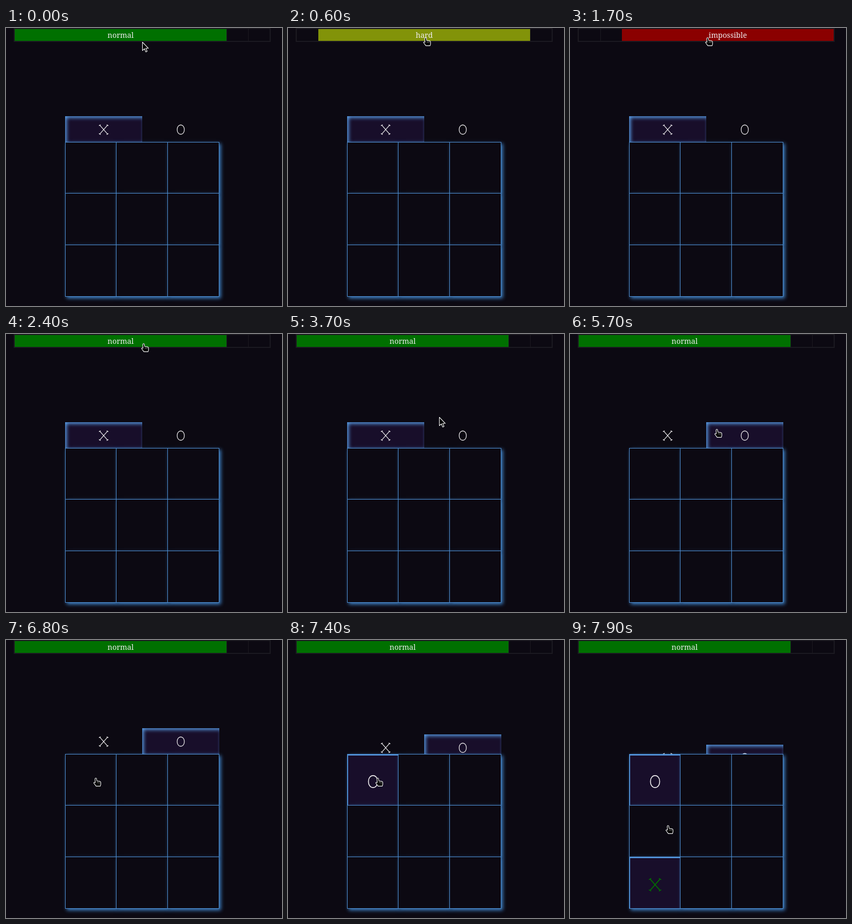
These frames come from a looping animation (537x539 px, 8 s). An HTML page:

```html
<!DOCTYPE html>
<html lang="en">
<head>
<meta charset="utf-8">
<title>Tic-tac-toe</title>
<style>
  html, body { margin: 0; width: 100%; height: 100%; overflow: hidden; background: #0c0912; }
  div, svg { position: absolute; box-sizing: border-box; }
  #stage { width: 537px; height: 539px; overflow: hidden; }
  #slider { left: 15px; top: 0; width: 500px; height: 27px; border: 2px solid #1c1a21; }
  #slider i { position: absolute; top: 0; width: 1px; height: 23px; background: #1c1a21; }
  #level { top: 0; width: 412px; height: 23px; color: #f0eef0; text-align: center;
           font: 14.5px/22px "Noto Serif", serif; }
  #tabs { left: 115px; top: 171px; width: 300px; height: 50px; }
  .tab { width: 150px; height: 50px; }
  .tab.on { background: #180e2a; box-shadow: inset 3px 3px 7px #589ce6; }
  .tab svg { left: 63px; top: 14px; width: 24px; height: 24px; }
  .cell { background: #0c0912; border: 1px solid #5091d6; box-shadow: 3px 3px 7px #3f83c8; }
  .cell.on { background: #180e2a; box-shadow: inset 1px 2px #5091d6, 3px 3px 7px #3f83c8; }
  .cell svg { width: 31px; height: 31px; left: 50%; top: 50%; margin: -12px 0 0 -15px; visibility: hidden; }
  .cell.on svg { visibility: visible; }
  svg { overflow: visible; fill: none; stroke: #eceaec; stroke-width: 1.3; }
  #cursor path { fill: #000; stroke: #fff; stroke-width: 1.1; stroke-linejoin: round; }
</style>
</head>
<body>
<div id="stage">
  <div id="slider"><i></i><i></i><i></i><i></i><div id="level"></div></div>
  <div id="tabs"></div>
  <div id="board"></div>
  <svg id="cursor" width="20" height="22">
    <path id="arrow" d="M.5.5v16.3l3.8-3.6 2.7 6.2 2.6-1.1-2.7-6h5.2z"/>
    <g id="hand" transform="translate(-5 -1)">
      <path d="M3.6 9.6 3.2 2.3a1.5 1.5 0 0 1 3 0L6.9 6.2l5.6.9q1.9.4 1.9 2.2v3.6l-1 3.5H5.3L.6 10q.8-1.8 3-.4z"/>
      <path d="M7.6 8.4v1.8M9.8 8.8v1.7M12 9.2v1.5" stroke-opacity=".6"/>
    </g>
  </svg>
</div>
<script>
const $ = id => document.getElementById(id);
const DURATION = 8000, STEP = 100;

const shapes = {
  X: '<path d="M-7.4-8.4 7.4 8.4M7.4-8.4-7.4 8.4M-9.2-7.6-5.8-9.4M9.2-7.6 5.8-9.4M-9.2 7.6-5.8 9.6M9.2 7.6 5.8 9.6"/>',
  O: '<rect x="-6.9" y="-9" width="13.8" height="18" rx="6.8" ry="8.2"/>'
};
const glyph = (name, color = '#eceaec') =>
  `<svg viewBox="-12 -12 24 24" style="stroke:${color}">${shapes[name]}</svg>`;

const levels = [['normal', '#007000'], ['hard', '#829309'], ['impossible', '#8b0000']];
const levelChanges = [[0, 0], [600, 1], [1700, 2], [2400, 0]];
const tabChanges = [[0, 0], [4200, 1], [5000, 0], [5700, 1]];
const moves = { 0: 7200, 6: 7600 }; // cell index: time it is filled

// Pointer moves: first step, last step, destination
const pointerStart = [265, 27];
const pointerMoves = [
  [100, 200, 268, 19], [2800, 3100, 287, 96], [3500, 3800, 296, 183],
  [4600, 4600, 240, 181], [5300, 5300, 286, 185], [5900, 6300, 241, 317],
  [6500, 6800, 175, 268], [7500, 7900, 191, 360]
];

$('tabs').innerHTML = ['X', 'O'].map((name, i) =>
  `<div class="tab" style="left:${i * 150}px">${glyph(name)}</div>`).join('');

const edge = (base, i) => base + 100 * i + (i ? 0 : 1);
$('board').innerHTML = Array.from({ length: 9 }, (_, i) => {
  const col = i % 3, row = Math.floor(i / 3);
  const x = edge(114, col), y = edge(220, row);
  const mark = i === 0 ? glyph('O') : i === 6 ? glyph('X', '#007000') : '';
  return `<div class="cell" style="left:${x}px;top:${y}px;width:${215 + 100 * col - x}px;height:${321 + 100 * row - y}px">${mark}</div>`;
}).join('');

const tabs = document.querySelectorAll('.tab');
const cells = document.querySelectorAll('.cell');
const dividers = document.querySelectorAll('#slider i');
[42, 84, 412, 454].forEach((x, i) => dividers[i].style.left = x + 'px');

const valueAt = (changes, t) => changes.filter(c => c[0] <= t).pop()[1];

function pointerAt(t) {
  let [x, y] = pointerStart;
  for (const [start, end, toX, toY] of pointerMoves) {
    if (t < start) break;
    const p = Math.min(1, (t - start + STEP) / (end - start + STEP));
    x += (toX - x) * p;
    y += (toY - y) * p;
  }
  return [x, y];
}

function draw(time) {
  const t = Math.floor((time % DURATION) / STEP) * STEP;

  const level = valueAt(levelChanges, t);
  $('level').textContent = levels[level][0];
  $('level').style.background = levels[level][1];
  $('level').style.left = level * 42 + 'px';
  dividers.forEach((d, i) => d.hidden = i < 2 ? i >= level : i - 2 < level);

  const active = valueAt(tabChanges, t);
  tabs.forEach((tab, i) => tab.classList.toggle('on', i === active));
  const slide = Math.max(0, Math.min(50, (t - 7100) * 0.04));
  $('tabs').style.transform = `translateY(${slide}px)`;

  cells.forEach((cell, i) => cell.classList.toggle('on', t >= moves[i]));

  const [x, y] = pointerAt(t);
  const clickable = y < 27 || y >= 171;
  $('cursor').style.transform = `translate(${Math.round(x)}px,${Math.round(y)}px)`;
  $('arrow').style.display = clickable ? 'none' : '';
  $('hand').style.display = clickable ? '' : 'none';
}

const begin = performance.now();
(function loop() {
  draw(performance.now() - begin);
  requestAnimationFrame(loop);
})();
</script>
</body>
</html>
```
